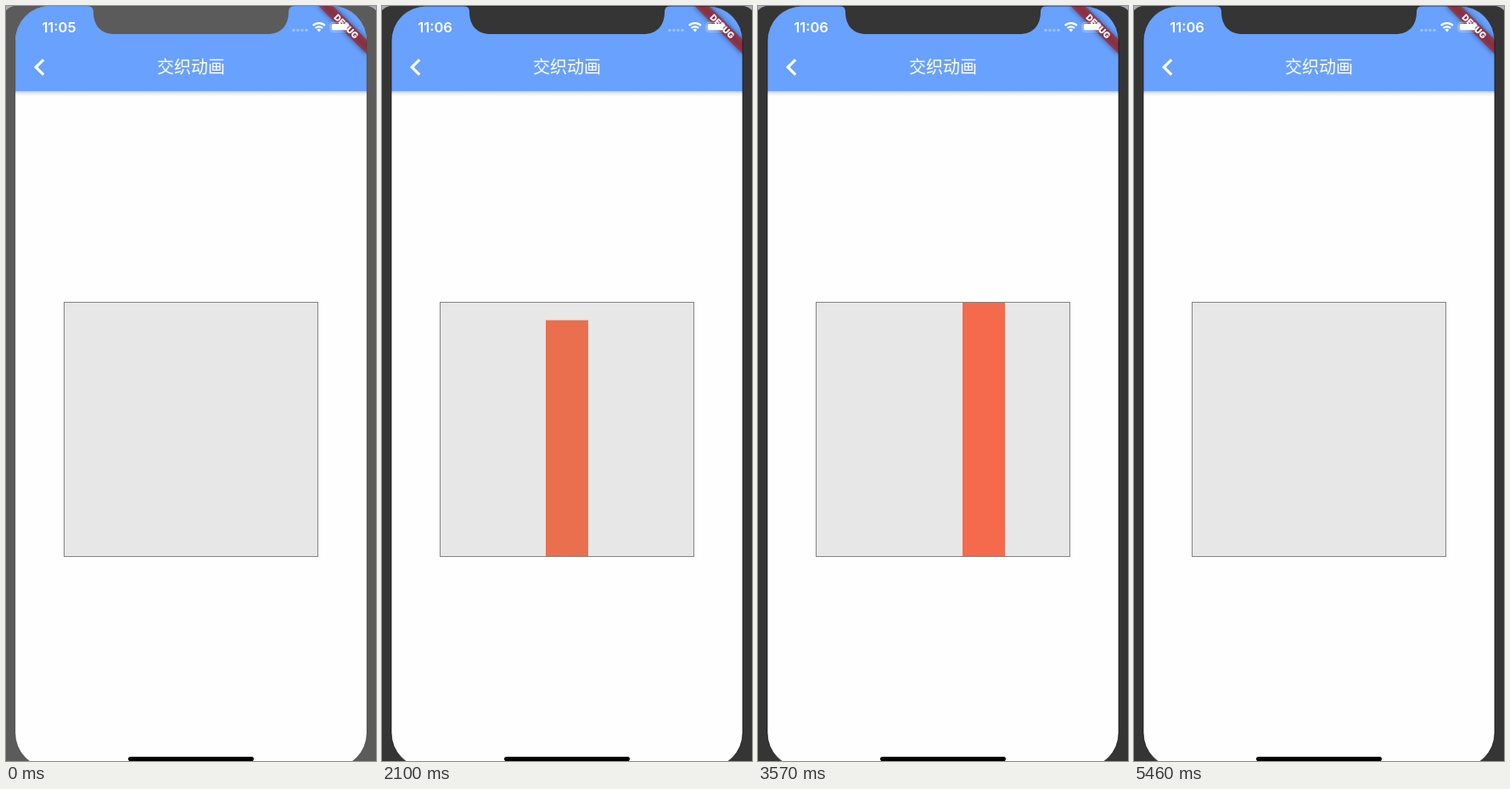
Recreate the animation shown at these times as an HTML page. Size 436 by 888 pixels, loop 5670 ms.

```html
<!DOCTYPE html>
<html lang="zh">
<head>
<meta charset="utf-8">
<style>
  html, body { margin: 0; height: 100%; overflow: hidden; }
  svg { display: block; width: 100vw; height: 100vh; }
  text { fill: #fff; text-anchor: middle; }
  #clock { font: 600 16.5px Inter, sans-serif; }
  #title { font: 500 20px "Noto Sans CJK SC", "Noto Sans CJK", sans-serif; }
  #debug { font: 900 10.2px Inter, Roboto, sans-serif; }
</style>
</head>
<body>
<svg viewBox="0 0 436 888">
  <defs>
    <clipPath id="screen"><rect x="11" width="414" height="896" rx="41"/></clipPath>
    <linearGradient id="shade" x2="0" y2="1">
      <stop stop-opacity=".24"/>
      <stop offset=".4" stop-opacity=".09"/>
      <stop offset="1" stop-opacity="0"/>
    </linearGradient>
    <filter id="blur" x="-20%" y="-80%" width="140%" height="260%"><feGaussianBlur stdDeviation="3"/></filter>
  </defs>

  <rect class="bezel" width="436" height="888"/>
  <path d="M0 0H9Q4 1 0 5ZM436 0H427Q432 1 436 5Z" fill="#a9adb4"/>

  <g clip-path="url(#screen)">
    <rect x="11" width="414" height="896" fill="#fefefe"/>
    <rect x="11" y="100" width="414" height="6" fill="url(#shade)"/>
    <rect x="11" width="414" height="100" fill="#69a1fe"/>
    <path d="M44.2 63.2L35.2 72L44.2 80.8" fill="none" stroke="#fff" stroke-width="3.2"/>
    <text id="title" x="218" y="79">交织动画</text>

    <rect x="68.5" y="348.5" width="299" height="299" fill="#e7e7e7" stroke="#828282"/>
    <rect id="bar" width="50"/>

    <g transform="translate(425 0) rotate(45)">
      <rect x="-40" y="28" width="80" height="12" opacity=".5" filter="url(#blur)"/>
      <rect x="-42" y="28" width="84" height="12" fill="#b71c1c" fill-opacity=".63"/>
      <text id="debug" y="37.7">DEBUG</text>
    </g>

    <text id="clock" x="62.5" y="30.8"></text>
    <g fill="#fff" opacity=".35">
      <circle cx="339" cy="28.5" r="1.7"/><circle cx="344" cy="28.5" r="1.7"/>
      <circle cx="349" cy="28.5" r="1.7"/><circle cx="354" cy="28.5" r="1.7"/>
    </g>
    <g fill="none" stroke="#fff" stroke-width="2.2">
      <path d="M361.7 23.1A10 10 0 0 1 375.9 23.1M364.5 26.1A6 6 0 0 1 373.1 26.1"/>
      <path d="M366.4 27.9A3.5 3.5 0 0 1 371.2 27.9L368.8 30.6Z" fill="#fff" stroke="none"/>
    </g>
    <rect x="382" y="19.3" width="22" height="11" rx="3" fill="none" stroke="#fff" stroke-opacity=".4"/>
    <rect x="383.7" y="21" width="18.6" height="7.6" rx="1.6" fill="#fff"/>
    <path d="M405.5 23Q407.5 24.8 405.5 26.6Z" fill="#fff" opacity=".45"/>

    <path class="bezel" d="M96 0Q103 0 103 7C103 23 112 33 128 33H308C324 33 333 23 333 7Q333 0 340 0Z"/>
    <rect x="144" y="883" width="148" height="5.2" rx="2.6"/>
  </g>
  <rect id="rim" x="11" width="414" height="896" rx="41" fill="none" stroke="#111"/>
</svg>
<script>
  const LOOP = 5670, STEP = 70, START = 1260, HALF = 2100;
  const $ = id => document.getElementById(id);
  const clamp = v => Math.min(1, Math.max(0, v));
  const green = [102, 180, 92], red = [245, 105, 77];

  // cubic-bezier(.25, .1, .25, 1), solved by bisection
  function ease(x) {
    if (x <= 0 || x >= 1) return clamp(x);
    let lo = 0, hi = 1, u;
    for (let i = 0; i < 24; i++) {
      u = (lo + hi) / 2;
      if (.75 * u * (1 - u) + u ** 3 < x) lo = u; else hi = u;
    }
    return .3 * u * (1 - u) ** 2 + 3 * u * u * (1 - u) + u ** 3;
  }

  function draw(ms) {
    const t = Math.floor(ms % LOOP / STEP) * STEP;
    const value = clamp(1 - Math.abs(t - START - HALF) / HALF);
    const grow = ease(value / .6), slide = ease((value - .6) / .4);
    const height = Math.min(298, 300 * grow);
    const bar = $("bar");
    bar.setAttribute("x", 193 + 50 * slide);
    bar.setAttribute("y", 647 - height);
    bar.setAttribute("height", height);
    bar.setAttribute("fill", `rgb(${green.map((g, i) => Math.round(g + (red[i] - g) * grow))})`);

    const active = t >= 1120;
    for (const el of document.querySelectorAll(".bezel")) el.setAttribute("fill", active ? "#353535" : "#5b5b5b");
    $("rim").setAttribute("stroke-opacity", active ? .7 : .15);
    $("clock").textContent = t < 560 ? "11:05" : "11:06";
  }

  const begin = performance.now();
  function tick() {
    draw(performance.now() - begin);
    requestAnimationFrame(tick);
  }
  tick();
</script>
</body>
</html>
```
